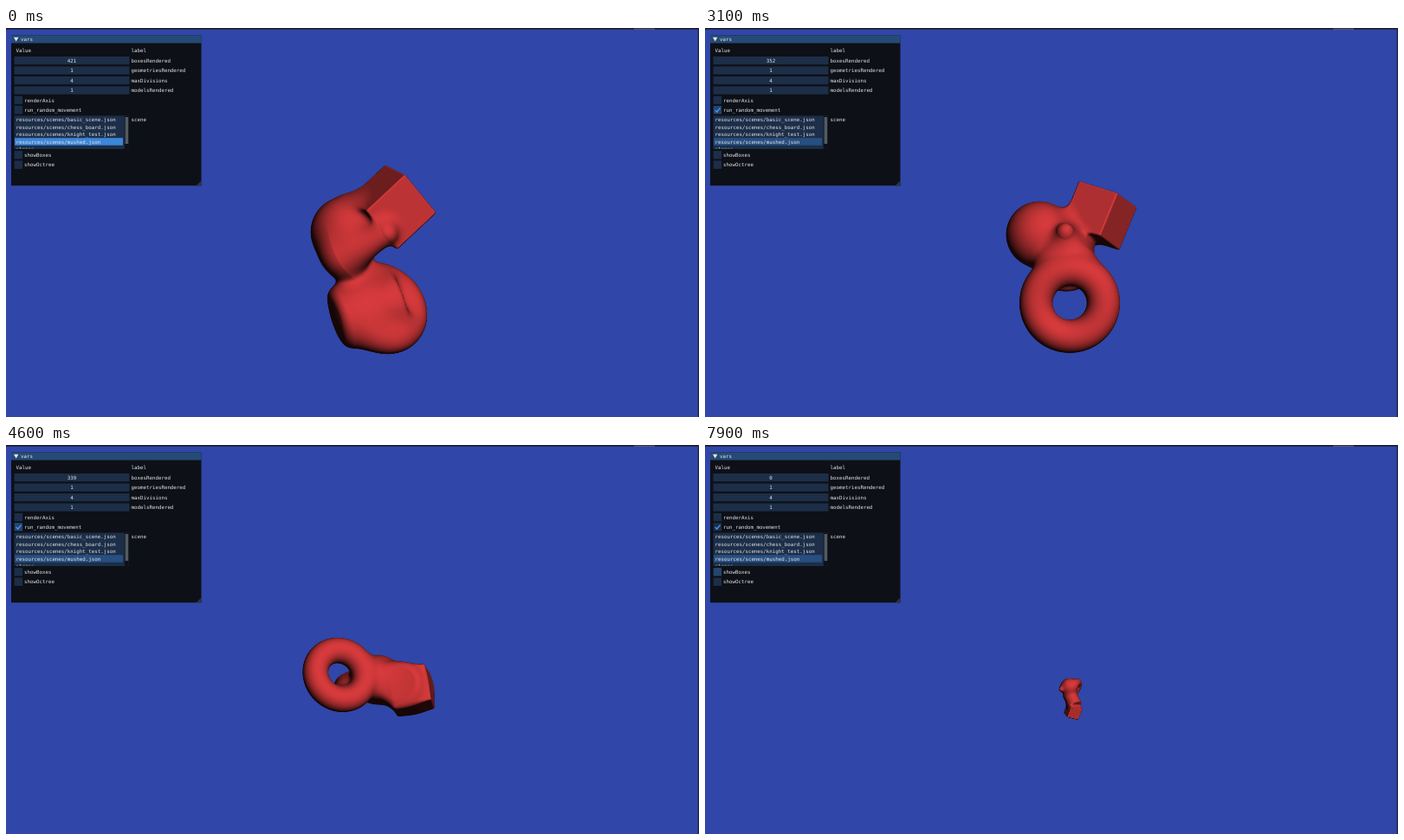
Write an HTML page with a canvas that moves like this. It is 800 px wide and 450 px high and loops after 8 s.

```html
<!DOCTYPE html>
<html lang="en">
<head>
<meta charset="utf-8">
<title>vars</title>
<style>
html, body { margin: 0; width: 100%; height: 100%; overflow: hidden; background: #3046a8; }
svg { display: block; width: 800px; height: 450px; }
canvas { position: absolute; left: 300px; top: 140px; }
text { font: 5.8px "DejaVu Sans Mono", monospace; fill: #e4e6ea; white-space: pre; text-rendering: geometricPrecision; }
</style>
</head>
<body>
<svg viewBox="0 0 800 450">
  <clipPath id="listClip"><rect x="9.5" y="101.5" width="132" height="38"/></clipPath>
  <rect width="800" height="450" fill="#3046a8"/>
  <rect width="800" height="1.6" fill="#1b1826"/>
  <rect x="725" y=".7" width="24" height="1" fill="#6b6a80"/>
  <rect x="798.6" width="1.4" height="450" fill="#232343"/>
  <g id="panel"></g>
</svg>
<canvas id="view" width="240" height="260"></canvas>
<script>
const LOOP = 8000, STEP = 100;
const panel = document.getElementById('panel');

function add(parent, tag, attrs, content = '') {
  const el = document.createElementNS('http://www.w3.org/2000/svg', tag);
  for (const k in attrs) el.setAttribute(k, attrs[k]);
  el.textContent = content;
  return parent.appendChild(el);
}
const rect = (x, y, width, height, fill) => add(panel, 'rect', { x, y, width, height, fill });
const label = (x, mid, s, parent = panel) => add(parent, 'text', { x, y: mid + 2 }, s);

// ---- settings window ----
const FRAME = '#1c2e48', HOVER = '#24466f', ROW = '#284f81', ROW_HOT = '#3c87d8';
rect(6, 8.3, 219.5, 174, '#0d1016');
rect(6, 8.3, 219.5, 9.2, '#264a77');
add(panel, 'path', { d: 'M9 10.8h5.4l-2.7 4.6z', fill: '#e4e6ea' });
add(panel, 'path', { d: 'M225.5 176.5v5.8h-5.8z', fill: '#2b3644' });
label(17, 12.9, 'vars');
label(11.5, 26.2, 'Value');
label(144.5, 26.2, 'label');

const fields = { boxesRendered: 421, geometriesRendered: 1, maxDivisions: 4, modelsRendered: 1 };
const [counter] = Object.entries(fields).map(([name, value], i) => {
  const mid = 37.6 + i * 11.5;
  rect(9.5, mid - 4.6, 133, 9.2, FRAME);
  label(144.5, mid, name);
  const el = label(76, mid, value);
  el.setAttribute('text-anchor', 'middle');
  return el;
});

function checkbox(mid, name) {
  label(21, mid, name);
  return rect(9.7, mid - 4.7, 9.4, 9.4, FRAME);
}
checkbox(83.5, 'renderAxis');
const moveBox = checkbox(94.8, 'run_random_movement');
const tick = add(panel, 'path', { d: 'M11.7 95l2 2.2 3.7-4.6', fill: 'none', stroke: '#4296fa', 'stroke-width': 1.4 });
rect(9.5, 101.5, 132.5, 38.5, FRAME);
const selected = rect(10, 127.2, 125, 8.5, ROW);
const list = add(panel, 'g', { 'clip-path': 'url(#listClip)' });
['basic_scene', 'chess_board', 'knight_test', 'mushed'].forEach((name, i) =>
  label(11.5, 106 + i * 8.5, `resources/scenes/${name}.json`, list));
label(11.5, 140, 'stress', list);
rect(136.8, 101.8, 5, 38, '#0c1119');
rect(137.6, 103, 3.6, 31, '#535a62');
label(144.5, 106, 'scene');
const showBox = checkbox(146.8, 'showBoxes');
checkbox(158.2, 'showOctree');

// ---- solids, smoothly joined ----
// Each takes a point in the part's own frame, in units of the part's size.
const len = (x, y, z = 0) => Math.sqrt(x * x + y * y + z * z);
const rounded = (x, y, z, r) =>
  len(Math.max(x, 0), Math.max(y, 0), Math.max(z, 0)) + Math.min(Math.max(x, y, z), 0) - r;
const solids = {
  ball: (x, y, z) => len(x, y, z) - 41,
  cube: (x, y, z) => rounded(Math.abs(x) - 28, Math.abs(y) - 28, Math.abs(z) - 28, 2),
  torus: (x, y, z) => len(len(x, y) - 37, z) - 18,
  drum: (x, y, z) => rounded(len(x, y) - 26, -1e3, Math.abs(z) - 30, 8),
  cone: (x, y, z) => {
    const h = Math.max(-1, Math.min(1, z / 26));
    return len(x, y, z - h * 26) - 16 + 7 * h;
  }
};

// Part: x, y, depth, lean of its axis in x and y, spin about the axis.
const keys = [
  { t: 2200, size: 1, boxes: 421,
    ball: [393, 236, 0], cube: [445, 207, 10, .37, .19, .85], torus: [434, 325, 0, .4, -.4],
    drum: [418, 326, 5, -.93, .3], cone: [414, 250, 35, .85, -.42] },
  { t: 3100, size: .9, boxes: 352,
    ball: [386, 239, 10], cube: [455, 217, 0, -.42, -.31, .35], torus: [421, 318, 50, 0, .1],
    drum: [416, 262, 10, .1, .5], cone: [416, 248, 35, 0, -.5] },
  { t: 4100, size: 1, boxes: 504,
    ball: [438, 250, 0], cube: [478, 264, -30, -.35, 0, -.1], torus: [381, 268, 10, .1, 0],
    drum: [469, 290, -55, .15, -.3], cone: [379, 268, -25, .1, .1] },
  { t: 5300, size: .5, boxes: 109,
    ball: [417, 302, -90], cube: [453, 311, -30, .29, -.57, -.35], torus: [392, 263, 0, .62, -.78],
    drum: [450, 266, 0, -.85, .05], cone: [405, 306, -20, -.8, .2] },
  { t: 6800, size: .23, boxes: 0,
    ball: [419, 281, 0], cube: [432, 306, 0, .3, .4, .3], torus: [425, 281, -20, .8, .5],
    drum: [427, 294, 0, .4, .8], cone: [414, 284, 0, -.6, .3] }
];
keys.push(turned(keys[4], 7900, -.32));

// The whole cluster rolled about its middle.
function turned(key, t, angle) {
  const c = Math.cos(angle), s = Math.sin(angle), out = { ...key, t };
  for (const name in solids) {
    const [x, y, ...rest] = key[name], dx = x - 425, dy = y - 291;
    out[name] = [423 + dx * c + dy * s, 291 - dx * s + dy * c, ...rest];
  }
  return out;
}

const mix = (a, b, k) => a + (b - a) * k;

function stateAt(t) {
  let i = 0;
  while (i < keys.length - 2 && t >= keys[i + 1].t) i++;
  const a = keys[i], b = keys[i + 1];
  const k = Math.max(0, Math.min(1, (t - a.t) / (b.t - a.t)));
  const size = mix(a.size, b.size, k);
  const parts = Object.keys(solids).map(name =>
    place(solids[name], a[name].map((v, j) => mix(v, b[name][j], k)), size));
  return { parts, size, boxes: Math.round(mix(a.boxes, b.boxes, k)) };
}

function place(solid, [x, y, z, u = 0, v = 0, spin = 0], size) {
  const fit = Math.max(1, len(u, v));
  u /= fit; v /= fit;
  const w = Math.sqrt(Math.max(0, 1 - u * u - v * v));
  const side = (c, s) => {
    const q = (c * u + s * v) / (1 + w);
    return [c - q * u, s - q * v, -q * (1 + w)];
  };
  const c = Math.cos(spin), s = Math.sin(spin);
  return { solid, x, y, z: z * size, size: size * (1 + z / 300), ax: side(c, s), ay: side(-s, c), az: [u, v, w] };
}

const dot = (m, x, y, z) => m[0] * x + m[1] * y + m[2] * z;

function distance({ parts, size }, x, y, z) {
  const soft = 20 * size;
  let d = 1e3;
  for (const p of parts) {
    const dx = (x - p.x) / p.size, dy = (y - p.y) / p.size, dz = (z - p.z) / p.size;
    const e = p.size * p.solid(dot(p.ax, dx, dy, dz), dot(p.ay, dx, dy, dz), dot(p.az, dx, dy, dz));
    const h = Math.max(0, soft - Math.abs(d - e));
    d = Math.min(d, e) - h * h / (4 * soft);
  }
  return d;
}

// ---- ray marching along the depth axis ----
const view = document.getElementById('view'), pen = view.getContext('2d');
const LEFT = 300, TOP = 140, LIGHT = [.24, -.32, .917], RED = [224, 61, 63];

function shade(state, x, y, z) {
  const e = .4, d = distance(state, x, y, z);
  const nx = distance(state, x + e, y, z) - d;
  const ny = distance(state, x, y + e, z) - d;
  const nz = distance(state, x, y, z + e) - d;
  return .1 + .86 * Math.max(0, dot(LIGHT, nx, ny, nz) / (len(nx, ny, nz) || 1));
}

function render(state) {
  const { width, height } = view, img = pen.createImageData(width, height);
  const far = 130 * state.size, reach = p => 62 * p.size;
  const low = (axis, from) => Math.max(0, Math.floor(Math.min(...state.parts.map(p => p[axis] - reach(p))) - from));
  const high = (axis, from, max) => Math.min(max, Math.ceil(Math.max(...state.parts.map(p => p[axis] + reach(p))) - from));
  const x0 = low('x', LEFT), x1 = high('x', LEFT, width), y1 = high('y', TOP, height);
  for (let row = low('y', TOP); row < y1; row++) {
    for (let col = x0; col < x1; col++) {
      const x = LEFT + col + .5, y = TOP + row + .5;
      let z = far, near = 1e3, nearZ = z;
      for (let n = 0; n < 70 && z > -far; n++) {
        const d = distance(state, x, y, z);
        if (d < near) { near = d; nearZ = z; }
        if (d < .1) break;
        z -= Math.max(d * .95, .1);
      }
      if (near > .7) continue;
      const light = shade(state, x, y, nearZ), at = (row * width + col) * 4;
      RED.forEach((v, i) => img.data[at + i] = v * light);
      img.data[at + 3] = near < .1 ? 255 : 255 * (1 - near / .7);
    }
  }
  pen.putImageData(img, 0, 0);
}

// ---- time ----
let lastTick = -1, lastPose = -1;
function draw(now) {
  const t = Math.floor(now % LOOP / STEP) * STEP;
  if (t === lastTick) return;
  lastTick = t;
  const pose = Math.max(t, keys[0].t);
  if (pose !== lastPose) {
    lastPose = pose;
    const state = stateAt(pose);
    render(state);
    counter.textContent = state.boxes;
  }
  selected.setAttribute('fill', t < 1100 ? ROW_HOT : ROW);
  moveBox.setAttribute('fill', t >= 1500 && t < 7700 ? HOVER : FRAME);
  showBox.setAttribute('fill', t >= 7700 ? HOVER : FRAME);
  tick.style.display = t >= 2200 ? '' : 'none';
}
const start = performance.now();
function loop() {
  draw(performance.now() - start);
  requestAnimationFrame(loop);
}
loop();
</script>
</body>
</html>
```
